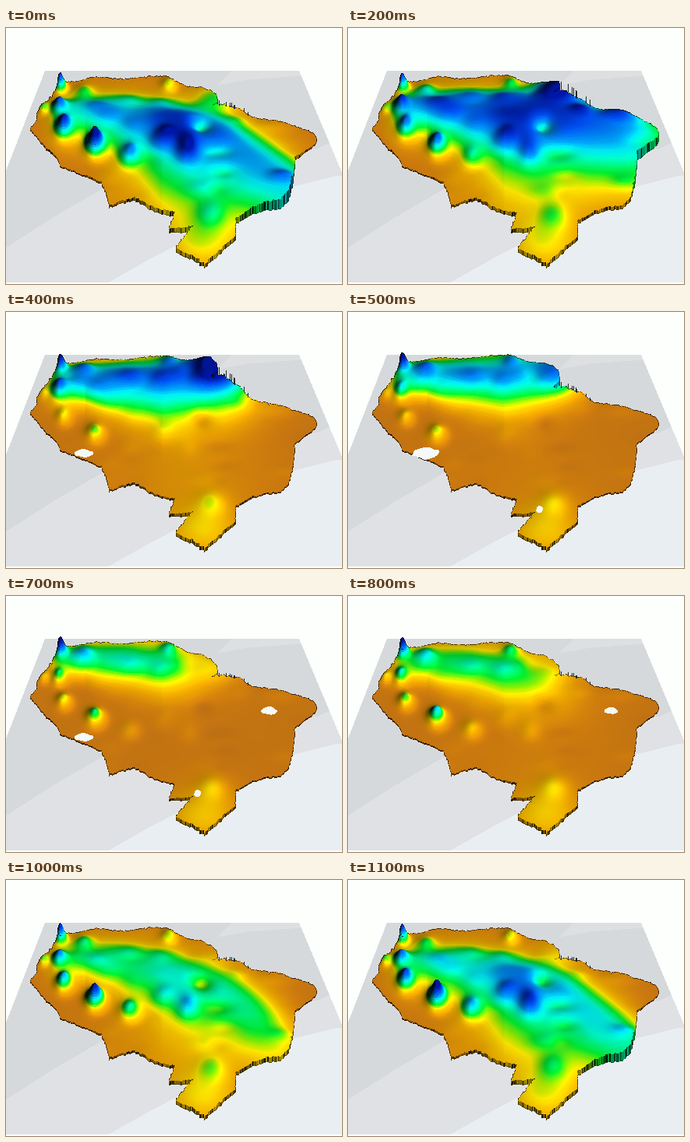
A matplotlib script for the animation above (1.4 s loop, 431x329 px).

```python
import numpy as np
import matplotlib.pyplot as plt
from matplotlib.animation import FuncAnimation
from matplotlib.path import Path

W, H, DPI = 431, 329, 64
FRAMES, LAST = 14, 11
X, Y = np.meshgrid(np.arange(W), np.arange(H))
PIXELS = np.column_stack([X.ravel(), Y.ravel()])

# Rainfall colours from dry to wet
LEVELS = [0, .5, 1, 2, 2.6, 3, 3.4, 4, 5, 5.5, 6, 7, 8]
COLOURS = np.array([
    (160, 108, 64), (182, 106, 24), (203, 122, 14), (224, 158, 0),
    (236, 190, 0), (244, 224, 0), (150, 224, 0), (0, 222, 44),
    (0, 234, 190), (0, 212, 224), (0, 150, 224), (0, 72, 218), (0, 20, 150)])

# Outline of the land on the ground, clockwise from the north-west
COAST = [
    (64, 85), (68, 78), (76, 74), (90, 73), (115, 66), (150, 70), (185, 65),
    (205, 66), (218, 73), (235, 80), (250, 82), (262, 88), (270, 97),
    (271, 104), (263, 110), (280, 107), (300, 109), (314, 119), (345, 123),
    (360, 126), (378, 132), (395, 138), (399, 145), (396, 150), (383, 161),
    (370, 170), (369, 195), (362, 222), (352, 232), (330, 235), (312, 241),
    (294, 252), (294, 272), (270, 294), (254, 308), (243, 300), (217, 288),
    (230, 274), (245, 258), (238, 262), (208, 263), (217, 243), (192, 237),
    (165, 222), (150, 225), (132, 231), (128, 215), (122, 200), (98, 190),
    (68, 178), (65, 168), (50, 155), (31, 131), (39, 122), (40, 113),
    (47, 104), (54, 97)]

# Summits: x, y, radius, height, share of the height that follows the season
PEAKS = [
    (69, 81, 5, 6, .1), (47, 109, 5, 2.2, .3), (67, 111, 6, 3, .1),
    (73, 139, 7, 4.5, .3), (113, 160, 8, 7, .32), (157, 175, 9, 3.2, .5),
    (208, 78, 7, 2, .2), (100, 88, 8, 1.4, .1), (232, 176, 9, 1, .6)]

# Dry gaps: x, y, half width, half height, driest month
GAPS = [(99, 181, 26, 11, 5.5), (245, 253, 7, 8, 6), (337, 147, 14, 7, 7)]


def season(month, peak):
    return np.cos(2 * np.pi * (month - peak) / 12)


def blob(x, y, w, d):
    return np.exp(-((X - x) / w) ** 2 / 2 - ((Y - y) / d) ** 2 / 2)


def ramp(x, width):
    return 1 / (1 + np.exp(-(X - x) / width))


def mask(points):
    return Path(points).contains_points(PIXELS).reshape(H, W)


def rough(points):
    """Break the outline into short, slightly ragged steps."""
    out = []
    for a, b in zip(points, points[1:] + points[:1]):
        a, b = np.array(a, float), np.array(b, float)
        n = max(1, int(np.hypot(*(b - a)) / 2))
        out += [a + (b - a) * k / n + rng.normal(0, .6, 2) for k in range(n)]
    return out


def backdrop():
    img = np.empty((H, W, 3))
    img[:] = 252, 255, 252
    floor = mask([(49.5, 54.5), (375.5, 54.5), (431.5, 188), (431.5, 326.5),
                  (-1, 326.5), (-1, 184)])
    img[floor] = 214, 217, 220
    zones = [
        ([(270, 73), (310, 66), (378, 61), (375, 54), (290, 54)],
         (221, 223, 225)),
        ([(-1, 282), (60, 243), (120, 208), (250, 150), (398, 155),
          (431, 140), (431, 327), (-1, 327)], (224, 225, 229)),
        ([(130, 327), (185, 296), (225, 275), (330, 225), (370, 203),
          (425, 189), (431, 189), (431, 327)], (233, 238, 242))]
    for points, colour in zones:
        img[floor & mask(points)] = colour
    return img


def rainfall(month):
    sun = season(month, .5)
    # The main belt swings north and south and bends towards the south-east
    bend = 25 + 38 * season(month, 10.7)
    axis = 106 + 13 * sun + bend * (np.maximum(X - 100, 0) / 200) ** 2
    south = (38 + 13 * sun) * np.clip((X - 20) / 180, .45, 1)
    north = 16 + .05 * X
    spread = np.where(Y < axis, north, south)
    belt = np.exp(-((Y - axis) / spread) ** 2 / 2)
    belt *= ramp(58, 8) * (1 - ramp(335 + 100 * sun, 20))

    v = .8 + (4.6 + 1.2 * season(month, 3)) * belt
    v += 1.8 * max(sun, 0) * blob(235, 142, 45, 18)
    v += (2 + 2 * season(month, 3)) * blob(265, 95, 22, 14)
    v += .9 * (1 + sun) * blob(230, 215, 70, 45)
    v += 1.8 * blob(250, 285, 35, 25) + 1.3 * blob(262, 250, 13, 12)
    v *= 1 + BUMPS
    for x, y, r, height, swing in PEAKS:
        v += height * (1 - swing + swing * season(month, 11)) * blob(x, y, r, r)
    return np.clip(v, 0, 9)


def render(month):
    v = rainfall(month)
    lift = 3 + 1.6 * v + .18 * v ** 2
    top = Y - lift

    # Light from the lower right
    hy, hx = np.gradient(.7 * lift)
    light = (1 - .9 * hx - .7 * hy) / np.sqrt(1 + hx ** 2 + hy ** 2)
    light = np.clip(light, .12, 1.12)
    surface = np.stack([np.interp(v, LEVELS, c) for c in COLOURS.T], -1)
    surface *= light[..., None]

    # Each pixel shows the nearest ground row that rises far enough
    row = np.full((H, W), -1)
    for d in range(40):
        hit = LAND[d:] & (top[d:] <= Y[:H - d])
        row[:H - d][hit] = Y[d:][hit]
    seen = row >= 0
    wall = seen & (Y - top[row, X] > 3)
    tint = np.where(wall, STREAKS[X], 1)
    inner = seen.copy()
    for axis, step in ((0, 1), (0, -1), (1, 1), (1, -1)):
        inner &= np.roll(seen, step, axis)
    tint[seen & ~inner & SPECKS] = .3

    img = BACK.copy()
    img[seen] = (surface[row, X] * tint[..., None])[seen]
    for x in HAIRS:
        y = seen[:, x].argmax()
        img[y - int(1 + 1.2 * v[row[y, x], x]):y + 2, x] = 30, 40, 40
    for x, y, rx, ry, driest in GAPS:
        wave = 1 + .2 * np.sin(X / 3 + Y / 2)
        reach = (season(month, driest) - .51) * wave
        gap = ((X - x) / rx) ** 2 + ((Y - y) / ry) ** 2 < reach
        img[gap & seen] = 245, 249, 249
    return np.clip(img, 0, 255).astype(np.uint8)


rng = np.random.default_rng(11)
LAND = mask(rough(COAST))
STREAKS = rng.choice([.1, .3, .5, .62, .72], W)
SPECKS = rng.random((H, W)) < .7
HAIRS = rng.choice(np.arange(271, 325), 8, replace=False)
BUMPS = sum(rng.normal(0, .13) * blob(rng.uniform(60, 380),
                                      rng.uniform(80, 240),
                                      rng.uniform(8, 15), rng.uniform(5, 9))
            for _ in range(60))
BACK = backdrop()
VIEWS = [render(m) for m in range(LAST + 1)]

fig = plt.figure(figsize=(W / DPI, H / DPI), dpi=DPI)
ax = fig.add_axes([0, 0, 1, 1])
ax.axis("off")
picture = ax.imshow(VIEWS[0], interpolation="nearest", aspect="auto")


def update(i):
    picture.set_data(VIEWS[min(i, LAST)])
    return [picture]


anim = FuncAnimation(fig, update, frames=FRAMES, interval=100, repeat=True,
                     repeat_delay=0)
plt.show()
```
